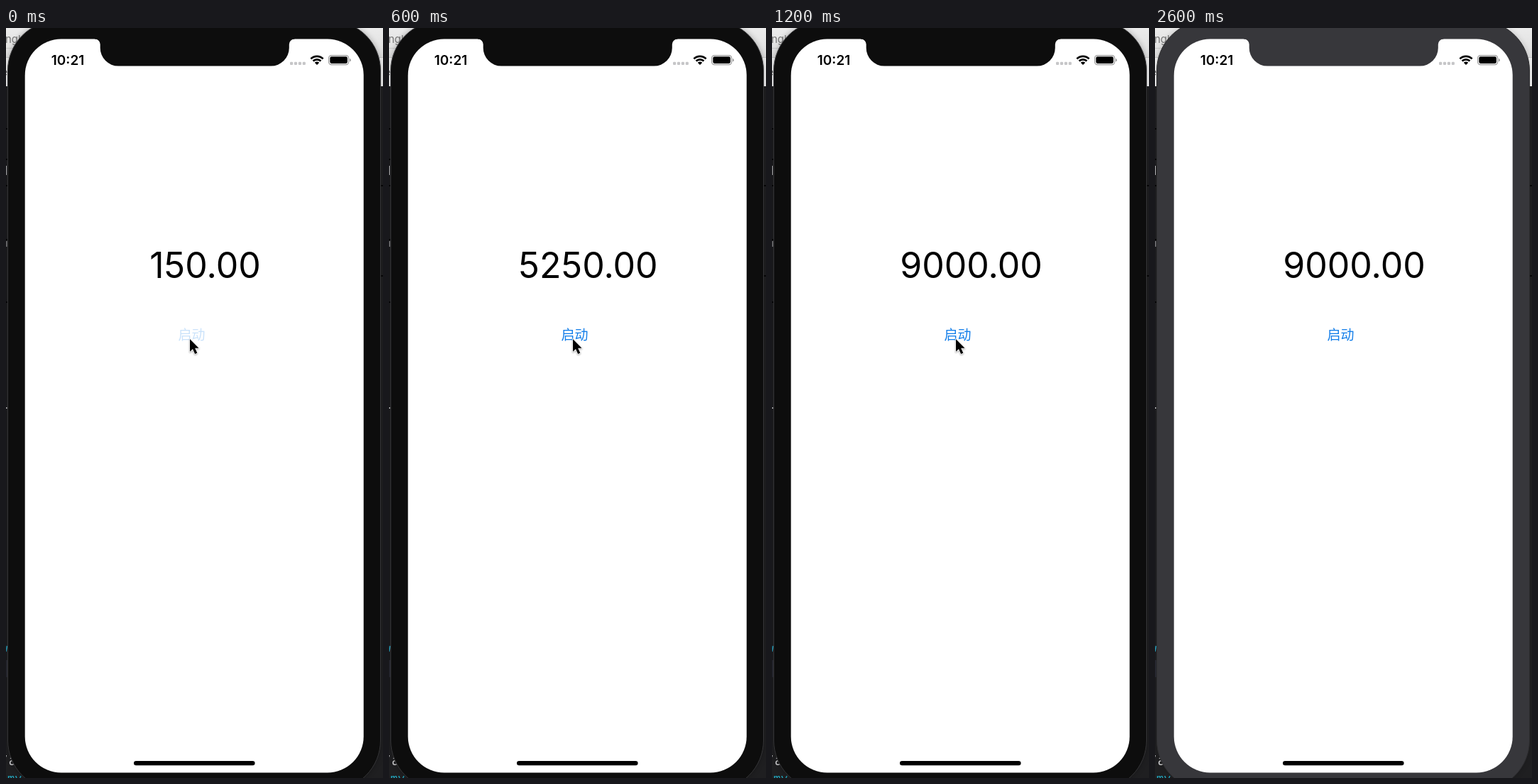
Animation, 531 px wide and 1056 px high, one loop 4000 ms. Source, as an HTML page:

```html
<!DOCTYPE html>
<html lang="zh-CN">
<head>
<meta charset="utf-8">
<title>Counter</title>
<style>
  html, body { margin: 0; width: 100%; height: 100%; overflow: hidden; background: #1d1d1f; }
  svg { display: block; width: 100%; height: 100%; }
  text { font-family: Inter, "Open Sans", sans-serif; white-space: pre; }
  .code { font-family: "Noto Sans Mono", "DejaVu Sans Mono", monospace; }
  #start { font-family: "Noto Sans CJK SC", "Noto Sans CJK", sans-serif; }
</style>
</head>
<body>
<svg viewBox="0 0 531 1056" preserveAspectRatio="none">
  <defs>
    <linearGradient id="bar" x1="0" y1="0" x2="0" y2="1">
      <stop offset="0" stop-color="#ebebeb"/>
      <stop offset="1" stop-color="#dedede"/>
    </linearGradient>
    <filter id="blur" x="-10%" y="-10%" width="120%" height="120%">
      <feGaussianBlur stdDeviation="4"/>
    </filter>
  </defs>

  <!-- desktop behind the phone -->
  <rect width="531" height="1056" fill="#1f1f21"/>
  <rect width="531" height="42" fill="url(#bar)"/>
  <rect y="42" width="531" height="40" fill="#f3f3f3"/>
  <path d="M0 28.5H20M0 41.5H531" stroke="#c9c9c9"/>
  <text x="-1" y="21" font-size="15" fill="#777">ngl</text>
  <text x="-6" y="67" font-size="14" fill="#555">e</text>
  <g id="lines" stroke="#000" stroke-width="1.5"></g>
  <rect y="890" width="6" height="24" fill="#2a2b33"/>
  <g fill="#c4c4c6">
    <rect y="194" width="1" height="13"/>
    <rect y="300" width="1.5" height="8" opacity=".6"/>
    <rect y="534" width="1.5" height="2"/>
  </g>
  <path d="M0 878L1.5 870" stroke="#2aa7c4" stroke-width="1.5"/>
  <text class="code" x="-8" y="1038" font-size="19" fill="#d0d0d2">/a</text>
  <text class="code" x="2" y="1062" font-size="17" fill="#22a5bd">mv</text>

  <!-- phone -->
  <rect id="shadow" x="2.5" y="-10" width="525" height="1083" rx="70" fill="#000" filter="url(#blur)"/>
  <rect id="body" x="2.5" y="-10" width="525" height="1083" rx="70"/>
  <rect x="26.7" y="15.5" width="477" height="1033" rx="51" fill="#fff"/>
  <path id="notch" d="M125 15H406.4V15.5A7.6 7.6 0 0 0 398.8 23.1V28A25.6 25.6 0 0 1 373.2 53.6H158.3A25.6 25.6 0 0 1 132.7 28V23.1A7.6 7.6 0 0 0 125.1 15.5Z"/>

  <!-- status bar -->
  <text x="63.8" y="51.8" font-size="19" font-weight="600">10:21</text>
  <g id="dots" fill="#c6c6c8"></g>
  <g id="wifi" fill="none" stroke="#000"></g>
  <rect x="454.6" y="38.6" width="28" height="13" rx="3.6" fill="none" stroke="#999" stroke-width="1.2"/>
  <rect x="456.3" y="40.3" width="24.6" height="9.6" rx="2.1"/>
  <path d="M484 43V47.4Q485.8 46.8 485.8 45.2T484 43Z" fill="#999"/>

  <text id="count" x="280.5" y="352" font-size="50" text-anchor="middle"></text>
  <text id="start" x="261.5" y="438.8" font-size="19" fill="#137ee9" text-anchor="middle">启动</text>
  <rect x="180" y="1031.9" width="170.6" height="6.4" rx="3.2"/>
  <path id="cursor" d="M259 438V455.8L263 452L266.2 459L269.3 457.6L266.2 450.8H271.6Z"
        stroke="#fff" stroke-width="1.6" paint-order="stroke" stroke-linejoin="round"
        style="filter:drop-shadow(0 1px 1.2px rgba(0,0,0,.35))"/>
</svg>
<script>
const LOOP = 4000, TICK = 200;
const $ = id => document.getElementById(id);

$('lines').innerHTML =
  [142, 185, 222, 298, 386].map(y => `<path d="M0 ${y}H5"/>`).join('') +
  [222, 349].map(y => `<path d="M525 ${y}H531"/>`).join('');

$('dots').innerHTML = [0, 1, 2, 3].map(i =>
  `<rect x="${400 + i * 5.9}" y="47.8" width="4.2" height="4.2" rx="1.3"/>`).join('');

// Quarter-circle band fanning up from the foot of the wifi mark
const band = (r, w) => {
  const d = r * Math.SQRT1_2;
  return `<path stroke-width="${w}" d="M${438 - d} ${52 - d}A${r} ${r} 0 0 1 ${438 + d} ${52 - d}"/>`;
};
$('wifi').innerHTML = band(12.2, 2.7) + band(7.7, 2.7) + band(2.3, 4.6);

function draw(t) {
  const tick = Math.floor(t / TICK);
  const value = tick ? Math.min(9000, 1650 + 1800 * (tick - 1)) : 150;
  $('count').textContent = value.toFixed(2);
  $('start').setAttribute('opacity', [0.22, 0.75][tick] ?? 1);
  $('cursor').setAttribute('visibility', t < 1400 ? 'visible' : 'hidden');

  const active = t < 2200;
  const shell = active ? '#0d0d0d' : '#37373b';
  $('body').setAttribute('fill', shell);
  $('body').setAttribute('stroke', active ? '#353537' : '#2c2c2e');
  $('notch').setAttribute('fill', shell);
  $('shadow').setAttribute('opacity', active ? 0.3 : 0.18);
}

function loop() {
  draw(performance.now() % LOOP);
  requestAnimationFrame(loop);
}
loop();
</script>
</body>
</html>
```
